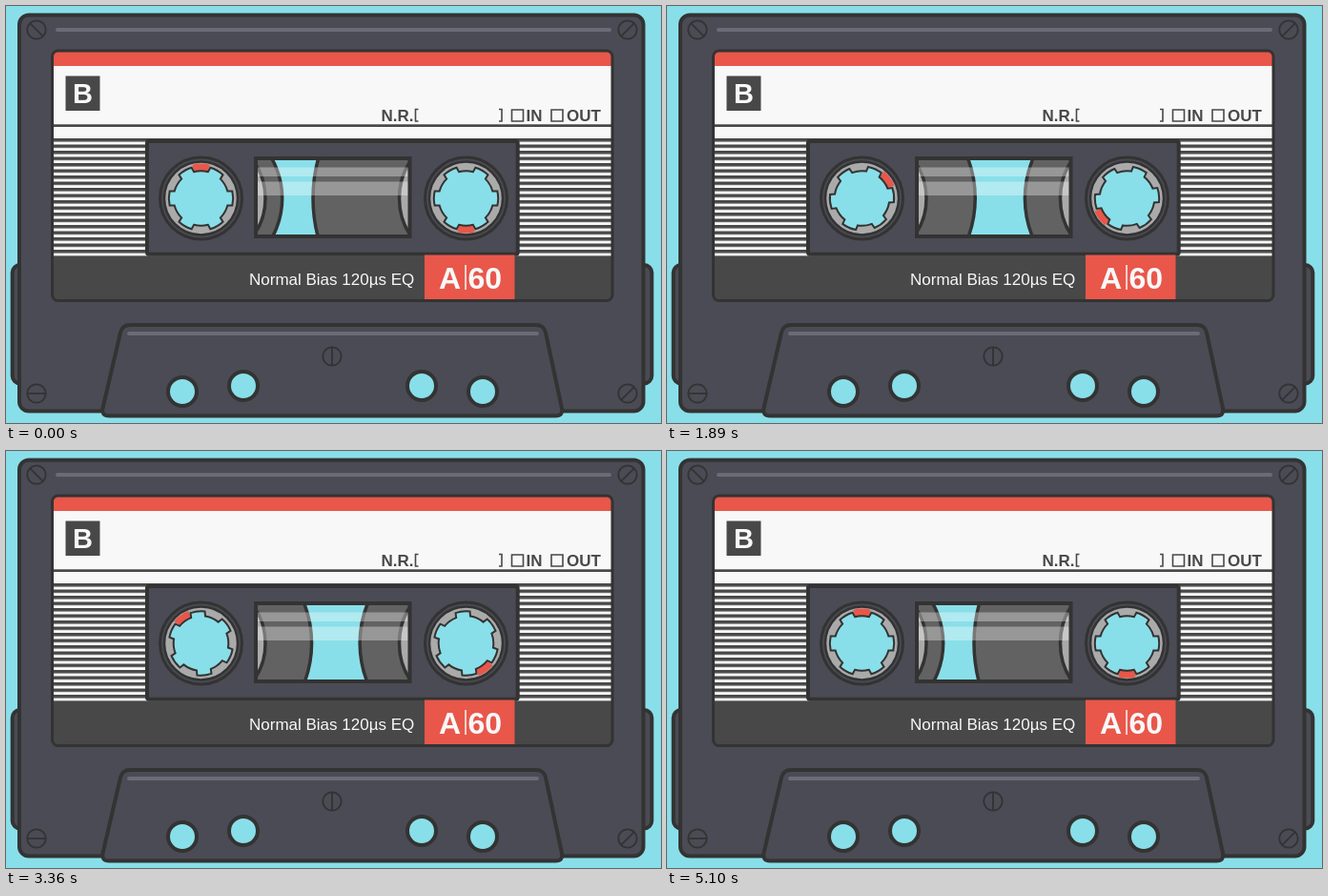
These frames come from a looping animation (687x438 px, 5400 ms). An HTML page:

```html
<!DOCTYPE html>
<html lang="en">
<head>
<meta charset="utf-8">
<title>Cassette</title>
<style>
  html, body { margin: 0; width: 100%; height: 100%; overflow: hidden; background: #89dfe9; }
  svg { display: block; width: 687px; height: 438px; }
  text { font-family: "Liberation Sans", Arial, sans-serif; }
  .line { stroke: #333; stroke-width: 4; }
  .body { fill: #4b4b55; }
  .cyan { fill: #89dfe9; }
  .white { fill: #f8f8f8; }
  .dark { fill: #484848; }
  .red { fill: #e8574a; }
  .shine { fill: none; stroke: #6b6b76; stroke-width: 4; stroke-linecap: round; }
  .thin { fill: none; stroke: #333; stroke-width: 1.8; }
  .mark { fill: none; stroke: #484848; stroke-width: 1.6; }
  .bold { font-weight: bold; }
</style>
</head>
<body>
<svg viewBox="0 0 687 438">
  <defs>
    <clipPath id="label"><rect x="48.500" y="47" width="587.500" height="262.500" rx="6"/></clipPath>
    <clipPath id="pane"><rect x="262" y="160" width="161.500" height="82"/></clipPath>
    <pattern id="stripes" y="139" width="10" height="6.5" patternUnits="userSpaceOnUse">
      <rect class="dark" width="10" height="3.5"/>
    </pattern>
  </defs>
  <rect class="cyan" width="687" height="438"/>

  <rect class="body line" x="6.700" y="272" width="670.600" height="124.500" rx="8"/>
  <rect class="body line" x="14" y="9.500" width="654.500" height="416" rx="10"/>
  <path class="shine" d="M54 25H633"/>

  <path class="body line" d="M130 335H556Q564 335 566 343L583 422.500Q584.500 430.500 576.500 430.500H108Q100 430.500 101.500 422.500L120 343Q122 335 130 335Z"/>
  <path class="shine" d="M129 344H557"/>
  <g id="holes" class="cyan line"></g>
  <g id="screws" class="thin"></g>

  <g clip-path="url(#label)">
    <rect class="white" x="48" y="47" width="589" height="263"/>
    <rect class="red" x="48" y="47" width="589" height="16"/>
    <rect class="dark" x="48" y="124.300" width="589" height="2.700"/>
    <rect x="48" y="139" width="589" height="123.500" fill="url(#stripes)"/>
    <rect class="dark" x="48" y="262.500" width="589" height="48"/>
  </g>
  <rect class="line" style="stroke-width: 3" fill="none" x="48.500" y="47" width="587.500" height="262.500" rx="6"/>

  <rect class="dark" x="62.500" y="73.500" width="36" height="36.500"/>
  <text class="white bold" x="80.500" y="102" font-size="29" text-anchor="middle">B</text>
  <g class="dark bold" font-size="17">
    <text x="393.500" y="121">N.R.</text>
    <text x="545.500" y="121">IN</text>
    <text x="588" y="121">OUT</text>
  </g>
  <path class="mark" d="M432.500 108.500H429.500V121H432.500M517 108.500H520V121H517M530.500 109H542.500V121H530.500ZM572 109H584V121H572Z"/>

  <rect class="body line" x="148" y="142" width="388.700" height="118.800" rx="2"/>
  <text class="white" x="255" y="293" font-size="17">Normal Bias 120µs EQ</text>
  <rect class="red" x="439" y="261.500" width="94.500" height="46.500"/>
  <g class="white bold" font-size="32">
    <text x="454" y="296.500">A</text>
    <text x="484.500" y="296.500">60</text>
    <rect x="481.300" y="272" width="1.500" height="26"/>
  </g>

  <g clip-path="url(#pane)">
    <rect class="cyan" x="262" y="160" width="162" height="82"/>
    <g id="spools" fill="#626262" stroke="#333" stroke-width="3.500"></g>
    <g fill="#fff" opacity=".34">
      <rect x="262" y="169.500" width="162" height="9.500"/>
      <rect x="262" y="184.500" width="162" height="14.500"/>
    </g>
  </g>
  <rect class="line" fill="none" x="262" y="160" width="161.500" height="82"/>
  <g id="hubs"></g>
</svg>
<script>
const STEP = 30, STEPS = 80, RUN = STEP * STEPS, REST = 300;
const LOOP = 2 * (RUN + REST), DEGREES = 18;
const AXIS_Y = 202;
const reels = [
  { x: 204.5, turn: 0, start: 85.2, end: 127.8, core: 67.5 },
  { x: 482.5, turn: 180, start: 160.5, end: 92.7, core: 70 }
];

function add(parent, name, attributes) {
  const node = document.createElementNS("http://www.w3.org/2000/svg", name);
  for (const key in attributes) node.setAttribute(key, attributes[key]);
  return parent.appendChild(node);
}

const byId = id => document.getElementById(id);

// Point at a clockwise angle from the top.
function polar(radius, degrees) {
  const a = degrees * Math.PI / 180;
  return `${(radius * Math.sin(a)).toFixed(2)} ${(-radius * Math.cos(a)).toFixed(2)}`;
}

function gearPath(inner, outer) {
  let d = "M" + polar(inner, -15);
  for (let k = 0; k < 6; k++) {
    const tooth = 30 + 60 * k;
    d += `A${inner} ${inner} 0 0 1 ${polar(inner, tooth - 15)}L${polar(outer, tooth - 13)}`
       + `A${outer} ${outer} 0 0 1 ${polar(outer, tooth + 13)}L${polar(inner, tooth + 15)}`;
  }
  return d + "Z";
}

for (const [cx, cy] of [[185, 405], [249, 399], [436, 399], [500, 405]])
  add(byId("holes"), "circle", { cx, cy, r: 15 });

for (const [x, y, angle] of [[32, 25, 45], [652, 25, -45], [32, 407, 0], [652, 407, -45], [342, 368, 90]]) {
  const screw = add(byId("screws"), "g", { transform: `translate(${x} ${y}) rotate(${angle})` });
  add(screw, "circle", { r: 9.7 });
  add(screw, "path", { d: "M-9.7 0H9.7" });
}

for (const reel of reels) {
  const center = { cx: reel.x, cy: AXIS_Y };
  reel.tape = add(byId("spools"), "circle", center);
  add(byId("spools"), "circle", { ...center, r: reel.core, fill: "#aaa" });

  const hub = add(byId("hubs"), "g", { transform: `translate(${reel.x} ${AXIS_Y})`, stroke: "#333" });
  add(hub, "circle", { r: 43, class: "body", "stroke-width": 3 });
  add(hub, "circle", { r: 38.5, fill: "#aaa", "stroke-width": 2.5 });
  reel.gear = add(hub, "g", {});
  add(reel.gear, "path", {
    d: `M0 0L${polar(36.5, -14.5)}A36.5 36.5 0 0 1 ${polar(36.5, 14.5)}Z`, class: "red", stroke: "none"
  });
  add(reel.gear, "path", { d: gearPath(28.8, 33.7), class: "cyan", "stroke-width": 2 });
}

function stepAt(time) {
  const half = RUN + REST;
  const step = Math.min(STEPS, Math.floor((time % half) / STEP));
  return time < half ? step : STEPS - step;
}

function draw(time) {
  const step = stepAt(time);
  for (const reel of reels) {
    reel.tape.setAttribute("r", reel.start + (reel.end - reel.start) * step / STEPS);
    reel.gear.setAttribute("transform", `rotate(${reel.turn + step * DEGREES})`);
  }
}

const began = performance.now();
function tick() {
  draw((performance.now() - began) % LOOP);
  requestAnimationFrame(tick);
}
tick();
</script>
</body>
</html>
```
